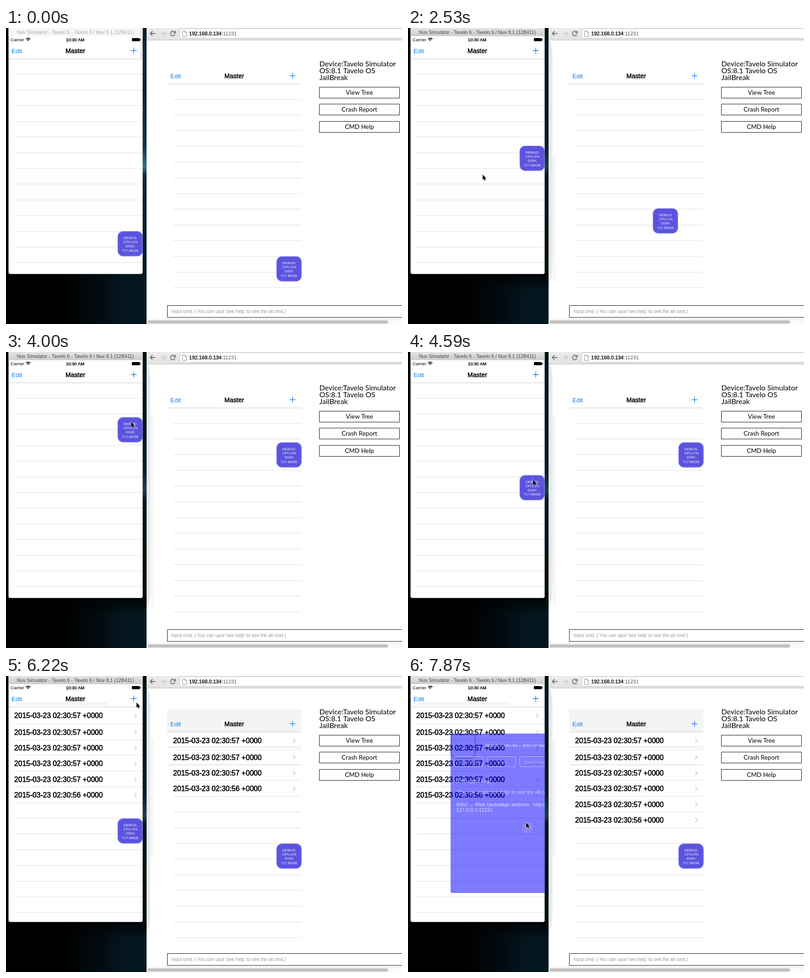
An HTML page with a canvas for the animation above (8000 ms loop, 865 px wide and 648 px high).

```html
<!DOCTYPE html>
<html lang="en">
<head>
<meta charset="utf-8">
<title>Debug overlay demo</title>
<style>
  html, body { margin: 0; width: 100%; height: 100%; overflow: hidden; background: #000; }
  canvas { display: block; }
</style>
</head>
<body>
<canvas id="stage" width="865" height="648"></canvas>
<script>
const ctx = document.getElementById('stage').getContext('2d');
const LOOP = 8000, STEP = LOOP / 54;
const SANS = '"Liberation Sans", Arial, sans-serif';
const ROUND = 'Lato, sans-serif';
const BLUE = '#0f7bf0';
const MIRROR_LAG = 3, FIRST_INSERT = 36, ROWS = 6;

// Keys are [step, ...values].
const CURSOR = [[5, 725, 563], [7, 590, 530], [10, 290, 492], [11, 259, 475], [12, 259, 475], [14, 203, 371],
  [15, 163, 321], [17, 163, 321], [19, 262, 290], [21, 273, 268], [23, 227, 160], [25, 273, 153],
  [28, 273, 153], [32, 273, 322], [35, 285, 58], [43, 285, 58], [45, 283, 85], [47, 283, 85], [51, 258, 321]];
const TILE = [[12, 244, 445], [13, 228, 405], [14, 188, 340], [15, 148, 291], [16, 218, 265], [17, 244, 258],
  [21, 244, 258], [23, 198, 150], [24, 244, 143], [28, 244, 143], [32, 244, 312]];
const CPU_PHONE = [[0, 2], [1, 1], [5, 2], [13, 1], [16, 2], [26, 1], [34, 2], [41, 4], [48, 2], [52, 3]];
const CPU_MIRROR = [[0, 2], [2, 1], [20, 2], [30, 1], [41, 4], [52, 2]];

const clamp = (v, lo, hi) => Math.min(hi, Math.max(lo, v));
const held = (keys, n) => keys.filter(k => k[0] <= n).pop()[1];

function along(keys, n) {
  const i = keys.findIndex(k => k[0] > n);
  if (i === 0) return keys[0].slice(1);
  if (i < 0) return keys[keys.length - 1].slice(1);
  const a = keys[i - 1], b = keys[i], p = (n - a[0]) / (b[0] - a[0]);
  return [a[1] + (b[1] - a[1]) * p, a[2] + (b[2] - a[2]) * p];
}

function rect(x, y, w, h, fill) {
  ctx.fillStyle = fill;
  ctx.fillRect(x, y, w, h);
}

function box(x, y, w, h, r, fill, stroke, width = 1) {
  ctx.beginPath();
  ctx.roundRect(x, y, w, h, r);
  if (fill) { ctx.fillStyle = fill; ctx.fill(); }
  if (stroke) { ctx.strokeStyle = stroke; ctx.lineWidth = width; ctx.stroke(); }
}

function path(points, stroke, width = 1) {
  ctx.beginPath();
  points.forEach(([x, y]) => ctx.lineTo(x, y));
  ctx.strokeStyle = stroke;
  ctx.lineWidth = width;
  ctx.stroke();
}

function gradient(x0, y0, x1, y1, ...stops) {
  const g = ctx.createLinearGradient(x0, y0, x1, y1);
  stops.forEach(([at, color]) => g.addColorStop(at, color));
  return g;
}

// y is the middle of the capitals; medium thickens the regular weight a little.
function text(str, x, y, size, color, { align = 'left', medium = false, font = SANS } = {}) {
  const base = y + size * 0.355;
  ctx.font = `${size}px ${font}`;
  ctx.textAlign = align;
  ctx.fillStyle = ctx.strokeStyle = color;
  ctx.fillText(str, x, base);
  if (medium) {
    ctx.lineWidth = size * .04;
    ctx.strokeText(str, x, base);
  }
}

function clipped(x, y, w, h, r, draw) {
  ctx.save();
  ctx.beginPath();
  ctx.roundRect(x, y, w, h, r);
  ctx.clip();
  draw();
  ctx.restore();
}

function desktop(active) {
  rect(0, 0, 307, 648, '#000');
  rect(298, 0, 9, 648, gradient(0, 0, 0, 648, [0, '#061820'], [.08, '#0b2a3a'], [.22, '#0a2230'],
    [.4, '#0d3348'], [.47, '#356f8c'], [.5, '#0c2636'], [.7, '#071a26'], [1, '#041820']));
  rect(120, 538, 187, 110, gradient(120, 0, 307, 0, [0, '#000'], [.45, '#020b10'], [.75, '#041720'], [1, '#04161f']));
  if (active) {
    rect(298, 0, 9, 538, 'rgba(0,0,0,.45)');
    rect(0, 538, 307, 40, gradient(0, 538, 0, 578, [0, 'rgba(0,0,0,.8)'], [1, 'rgba(0,0,0,0)']));
  }
}

function tile(x, y, cpu) {
  ctx.save();
  ctx.shadowColor = 'rgba(90,85,225,.35)';
  ctx.shadowBlur = 2;
  box(x, y, 54.5, 54.5, 12, 'rgba(88,80,220,.97)');
  ctx.restore();
  box(x + 1.2, y + 1.2, 52.1, 52.1, 11, null, 'rgba(120,115,240,.3)', 2.4);
  ['DEBUG', `CPU:${cpu}%`, 'DISK:', '717.86GB'].forEach((s, i) =>
    text(s, x + (i % 2 || !i ? 27 : 28) + (i === 1 ? 1 : 0), y + 14 + i * 9.3, 8, '#efeeff', { align: 'center' }));
}

function plus(color) {
  path([[272.5, 49.5], [285.5, 49.5]], color, 1.3);
  path([[279, 43], [279, 56]], color, 1.3);
}

// Navigation bar and table, shared by the phone and its web copy.
function screen(count, inserting) {
  text('Edit', 12, 50, 13.4, BLUE);
  text('Master', 151.5, 50, 14, '#000', { align: 'center', medium: true });
  const line = (y, x = 18, color = '#dfdfe1') => rect(x, Math.round(y), 298 - x, 1, color);
  line(67, 5, '#cacacc');
  const first = inserting && count === 1;
  const top = count ? 105 : 101, pitch = first ? 38.33 : 34.4;
  for (let k = first ? 1 : 0; k < 13; k++) line(top + k * pitch - .4);
  for (let i = 0; i < count; i++) {
    const y = i ? 123 + (i - 1) * 34.4 : 86.5;
    const faint = inserting && i === 0;
    text(`2015-03-23 02:30:${i === count - 1 ? 56 : 57} +0000`, 18, y, 15.65,
      faint ? '#e4e4e4' : '#000', { medium: !faint });
    if (!faint) path([[280, y - 4.5], [285, y], [280, y + 4.5]], '#c4c4c9', 1.3);
  }
}

function statusBar() {
  text('Carrier', 10, 25.5, 9.8, '#000');
  text('10:30 AM', 151, 25.5, 9.4, '#000', { align: 'center', medium: true });
  [2, 4.5, 7].forEach(r => {
    ctx.beginPath();
    ctx.arc(48.5, 29, r, -Math.PI * .75, -Math.PI * .25);
    ctx.strokeStyle = '#000';
    ctx.lineWidth = 1.5;
    ctx.stroke();
  });
  box(275, 22, 17.5, 7, 1.5, '#000');
  rect(293, 24, 1.2, 3, '#000');
}

function panel(p) {
  const x = 244 - 151 * p, y = 312 - 186 * p;
  box(x, y, 54 + 226 * p, 54 + 295 * p, 3, 'rgba(6,0,255,.52)');
  box(x + 1, y + 1, 53, 53, 11, null, 'rgba(70,62,205,.75)', 1.5);
  const ink = a => `rgba(255,255,255,${a * p})`;
  text('DEBUG  |  CPU:3%  |  DISK:717.86GB', x + 76, y + 26, 8, ink(.95));
  ['View Tree', 'Action', 'Crash Report'].forEach((s, i) => {
    const left = x + 8 + i * 71.5;
    box(left, y + 50.5, 63, 22, 4, null, ink(.5));
    text(s, left + 32, y + 62, 8, ink(.5), { align: 'center' });
  });
  text('[Debugger Log]', x + 12, y + 103, 11, ink(.55));
  text("'You can input 'see help' to see the all cmd.'", x + 13, y + 128, 11, ink(.6));
  text('/Info/ → Web backstage address : http://', x + 12, y + 155, 11, ink(.75));
  text('127.0.0.1:11231', x + 12, y + 167, 11.2, ink(.75));
  ctx.beginPath();
  ctx.arc(261.5, 332, 12.5, 0, 7);
  ctx.fillStyle = 'rgba(165,150,255,.4)';
  ctx.fill();
}

function phone(n, active) {
  const count = clamp(n - FIRST_INSERT + 1, 0, ROWS);
  const inserting = n >= FIRST_INSERT && n < FIRST_INSERT + ROWS;
  clipped(5.5, -6, 293, 544.5, 4, () => {
    rect(5, 0, 294, 540, '#fff');
    rect(5, 0, 294, 18, active ? gradient(0, 0, 0, 18, [0, '#e4e4e4'], [1, '#cdcdcd']) : '#f6f6f6');
    text('Nuv Simulator - Tavelo 6 - Tavelo 6 / Nuv 8.1 (12B411)', 151.5, 9, 10.6,
      active ? '#454545' : '#ababab', { align: 'center' });
    if (!active) rect(293, 1, 5, 67, '#e9e9e9');
    if (n >= 42) rect(21, 58, 201, 7, '#f4f4f4');
    statusBar();
    screen(count, inserting);
    const pressed = inserting && n % 2 === 0;
    plus(pressed ? '#9cc6f5' : BLUE);
    if (pressed) box(264.5, 38.5, 30, 22, 0, null, '#8a82f2', 1.6);
    if (n < 52) tile(...along(TILE, n), held(CPU_PHONE, n));
    else panel((n - 51) / 2);
  });
}

function browserBar() {
  rect(307, 0, 558, 26, gradient(0, 0, 0, 26, [0, '#ececec'], [1, '#e2e2e2']));
  rect(307, 26, 558, 1, '#bcbcbc');
  box(379.5, 1.5, 500, 21, 3, '#fff', '#bdbdbd');
  const arrow = (tip, dir, color) => {
    path([[tip, 12], [tip + 12 * dir, 12]], color, 2);
    path([[tip + 5.5 * dir, 7], [tip + .8 * dir, 12], [tip + 5.5 * dir, 17]], color, 2);
  };
  arrow(314.5, 1, '#747474');
  arrow(349, -1, '#cbcbcb');
  ctx.beginPath();
  ctx.arc(364.5, 12, 5, .5, 5.6);
  ctx.strokeStyle = '#747474';
  ctx.lineWidth = 2;
  ctx.stroke();
  path([[370, 6], [370, 11], [365, 11]], '#747474', 1.8);
  path([[385.5, 6.5], [391, 6.5], [394.5, 10], [394.5, 18.5], [385.5, 18.5], [385.5, 6.5]], '#8a8a8a');
  path([[391, 6.5], [391, 10], [394.5, 10]], '#8a8a8a');
  text('192.168.0.134', 400, 12.5, 11.1, '#111', { medium: true });
  const host = ctx.measureText('192.168.0.134').width;
  text(':11231', 400 + host, 12.5, 11.1, '#555');
}

// Soft edge that the active phone window casts on the page.
function windowShadow(n) {
  const top = n < 24 ? 283 : 139, bottom = n < 42 ? 556 : 398;
  rect(316, top, 7, bottom - top, '#f7f7f7');
  ctx.beginPath();
  ctx.moveTo(307, 27);
  ctx.quadraticCurveTo(316, 30, 316, 70);
  ctx.lineTo(316, 500);
  ctx.quadraticCurveTo(316, 552, 307, 560);
  ctx.fillStyle = gradient(307, 0, 317, 0, [0, '#e2e2e2'], [1, '#f0f0f0']);
  ctx.fill();
}

function browser(n, active) {
  const seen = n - MIRROR_LAG;
  const count = clamp(seen - FIRST_INSERT + 1, 0, ROWS);
  rect(307, 0, 558, 648, '#fff');
  if (active) windowShadow(n);
  browserBar();
  if (count) rect(352, 72, 293.5, 50, '#f3f5f4');

  ctx.save();
  ctx.translate(347, 55);
  screen(count, false);
  plus(BLUE);
  if (count) [100, 139].forEach(y => rect(5, y, 293, 1, '#cfcfd1'));
  tile(...along(TILE, seen), held(CPU_MIRROR, n));
  ctx.restore();

  ['Device:Tavelo Simulator', 'OS:8.1 Tavelo OS', 'JailBreak'].forEach((s, i) =>
    text(s, 684.5, 78 + i * 15, 16, '#000', { font: ROUND }));
  ['View Tree', 'Crash Report', 'CMD Help'].forEach((s, i) => {
    const y = Math.floor(129 + i * 37.5) + .5;
    box(684.5, y, 175, 24, 0, null, '#111');
    text(s, 772, y + 11.5, 13.6, '#000', { align: 'center', font: ROUND });
  });

  box(352.5, 607.5, 530, 26, 0, '#fff', '#111');
  text("Input cmd. ( You can uput 'see help' to see the all cmd.)", 361.5, 620.5, 10.2, '#959595');
  rect(307, 637, 558, 11, '#f9f9f9');
  rect(307, 637, 558, 1, '#e8e8e8');
  box(309, 640, 525.5, 7, 3.5, '#c1c1c1');
}

function cursor(x, y) {
  ctx.beginPath();
  [[0, 0], [0, 11.5], [2.7, 9], [4.6, 13], [6.6, 12.1], [4.9, 8.2], [8.2, 8.2]]
    .forEach(([dx, dy]) => ctx.lineTo(x + dx, y + dy));
  ctx.closePath();
  ctx.strokeStyle = 'rgba(255,255,255,.8)';
  ctx.lineWidth = 1.4;
  ctx.stroke();
  ctx.fillStyle = '#000';
  ctx.fill();
}

function draw(ms) {
  const n = Math.floor(ms / STEP + .05) % 54;
  const active = n >= 12;
  desktop(active);
  browser(n, active);
  phone(n, active);
  if (n >= 5) cursor(...along(CURSOR, n));
}

const start = performance.now();
function tick() {
  draw((performance.now() - start) % LOOP);
  requestAnimationFrame(tick);
}
tick();
</script>
</body>
</html>
```
